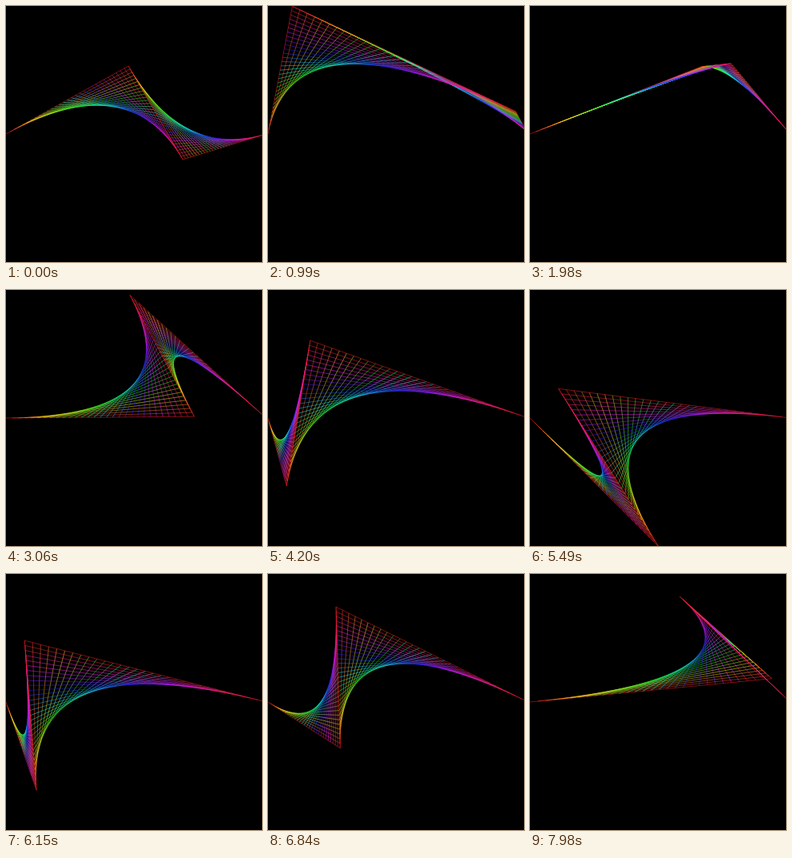
Write an HTML page with a canvas that moves like this. It is 320 px wide and 320 px high and loops after 8000 ms.

```html
<!DOCTYPE html>
<html lang="en">
<head>
<meta charset="utf-8">
<title>Rainbow string art</title>
<style>
  html, body { margin: 0; height: 100%; overflow: hidden; background: #000; }
  canvas { display: block; width: 100vw; height: 100vh; }
</style>
</head>
<body>
<canvas width="320" height="320"></canvas>
<script>
const ctx = document.querySelector('canvas').getContext('2d');
const LOOP = 8000, STEP = 30, TURN = 5340, STRINGS = 30;
const START = [0, 160], END = [325, 160];

// Two free control points drift in straight lines and bounce: [time, value] per axis
const FIRST = {
  x: [[0, 153], [826, 0], [2578, 325], [4325, 0], [TURN, 188.5]],
  y: [[0, 75], [985, 0], [TURN, 332]]
};
const SECOND = {
  x: [[0, 221], [1160, 325], [4790, 0], [TURN, 49]],
  y: [[0, 192], [3165, 0], [TURN, 132.5]]
};

const mix = (a, b, k) => a + (b - a) * k;
const between = (p, q, k) => [mix(p[0], q[0], k), mix(p[1], q[1], k)];

function valueAt(keys, time) {
  const i = Math.max(1, keys.findIndex(key => key[0] >= time));
  const [t0, v0] = keys[i - 1], [t1, v1] = keys[i];
  return mix(v0, v1, (time - t0) / (t1 - t0));
}

const pointAt = (path, time) => [valueAt(path.x, time), valueAt(path.y, time)];

function drawString(p, q) {
  ctx.beginPath();
  ctx.moveTo(...p);
  ctx.lineTo(...q);
  ctx.stroke();
}

function render(now) {
  const elapsed = Math.floor((now % LOOP) / STEP) * STEP;
  const time = TURN - Math.abs(TURN - elapsed); // the motion runs backwards after the turn
  const first = pointAt(FIRST, time), second = pointAt(SECOND, time);

  ctx.globalAlpha = 1;
  ctx.fillStyle = '#000';
  ctx.fillRect(0, 0, 320, 320);

  ctx.globalAlpha = 0.6;
  ctx.lineWidth = 0.9;
  for (let i = 0; i <= STRINGS; i++) {
    const k = i / STRINGS;
    const middle = between(first, second, k);
    ctx.strokeStyle = `hsl(${360 * k}, 85%, 52%)`;
    drawString(between(START, first, k), middle);
    drawString(middle, between(second, END, k));
  }
}

const began = performance.now();
function tick() {
  render(performance.now() - began);
  requestAnimationFrame(tick);
}
tick();
</script>
</body>
</html>
```
